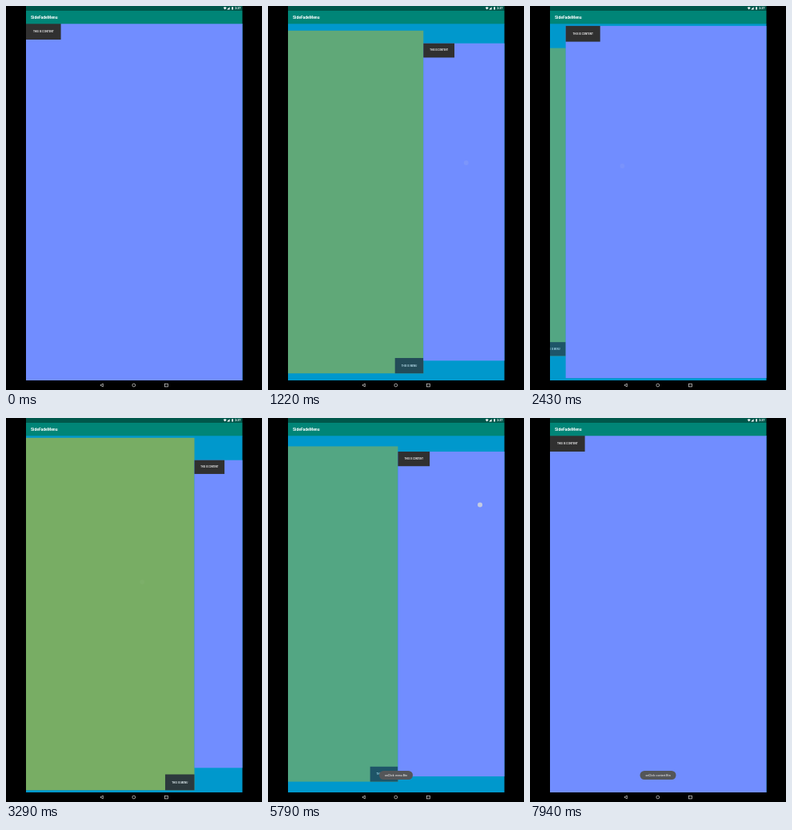
Write an HTML page that moves like this. It is 320 px wide and 480 px high and loops after 8 s.

```html
<!DOCTYPE html>
<html lang="en">
<head>
<meta charset="utf-8">
<title>SideFadeMenu</title>
<style>
html, body { margin: 0; width: 100%; height: 100%; overflow: hidden; background: #000; }
svg { display: block; width: 100vw; height: 100vh; }
text { font-family: Roboto, sans-serif; fill: #fff; }
.label { font-size: 3.2px; font-weight: 500; text-anchor: middle; }
</style>
</head>
<body>
<svg viewBox="0 0 320 480">
  <clipPath id="page"><rect x="25" y="22" width="270.5" height="446"/></clipPath>
  <rect width="320" height="480"/>
  <g clip-path="url(#page)">
    <rect x="25" y="22" width="271" height="446" fill="#0098cc"/>
    <!-- menu: origin at its right middle -->
    <g id="menu">
      <rect x="-230" y="-223" width="230" height="446" fill="#83af5b"/>
      <rect x="-37" y="203" width="37" height="20" fill="#303030"/>
      <text class="label" x="-18.5" y="214.2">THIS IS MENU</text>
    </g>
    <!-- content: origin at its left middle -->
    <g id="content">
      <rect y="-223" width="271" height="446" fill="#718dff"/>
      <rect y="-223" width="43.6" height="20" fill="#303030"/>
      <text class="label" x="21.8" y="-212">THIS IS CONTENT</text>
    </g>
  </g>
  <rect x="25" width="270.5" height="6" fill="#00574b"/>
  <rect x="25" y="6" width="270.5" height="16.3" fill="#008577"/>
  <text x="31" y="16" font-size="5" font-weight="700">SideFadeMenu</text>
  <g fill="#fff">
    <path d="M271.7 1.9q2-1.4 4 0l-2 2.7zM279.6 1.2v3.4h-3.4zM282.2 1.3h1.8v3.3h-1.8z"/>
    <text x="286.2" y="4.4" font-size="3.6" font-weight="700">2:37</text>
  </g>
  <g fill="none" stroke="#ddd" stroke-width=".7">
    <path d="M121.3 472.1v3.8l-3.5-1.9z"/>
    <circle cx="159.8" cy="474" r="1.9"/>
    <rect x="198.6" y="472.2" width="3.7" height="3.7"/>
  </g>
  <g id="toast">
    <rect y="441" height="11" rx="5.5" fill="#545659"/>
    <text x="160" y="447.8" font-size="3.5" text-anchor="middle"></text>
  </g>
  <circle id="dot" r="3" fill="#d2d6dc"/>
</svg>
<script>
const $ = id => document.getElementById(id);
const [menu, content, toast, dot] = ['menu', 'content', 'toast', 'dot'].map($);
const [toastBox, toastText] = toast.children;
const LOOP = 8000, TRAVEL = 229.5;

const clamp = v => Math.max(0, Math.min(1, v));
const ramp = (t, start, len) => clamp((t - start) / len);
const smooth = u => (1 - Math.cos(Math.PI * u)) / 2;
const settle = u => 1 - (1 - u) ** 5;

// Finger drags the page from one openness to another, then it settles.
const moves = [
  { down: 500, drag: 540, up: 1200, from: 0, mid: .6, to: 1, len: 260, x: 110, y: 196 },
  { down: 1930, drag: 1980, up: 2380, from: 1, mid: .3, to: 0, len: 230, x: 276, y: 200 },
  { down: 2930, drag: 2960, up: 3205, from: 0, mid: .52, to: 1, len: 290, x: 51, y: 205 },
  { down: 5650, drag: 5650, up: 5752, from: 1, mid: 1, to: 0, len: 400, x: 265, y: 108.5, hold: 80 },
  { down: 4360, up: 4560, x: 242, y: 457 },
  { down: 6950, up: 7230, x: 46, y: 32 }
].sort((a, b) => a.down - b.down);

const toasts = [
  { text: 'onClick: menu Btn', width: 42, on: 4580, off: 6560 },
  { text: 'onClick: content Btn', width: 45, on: 7250, off: 9000 }
];

function openness(t) {
  let p = 0;
  for (const m of moves) {
    if (m.len === undefined || t < m.down) continue;
    p = t < m.up
      ? m.from + (m.mid - m.from) * smooth(ramp(t, m.drag, m.up - m.drag))
      : m.mid + (m.to - m.mid) * settle(ramp(t, m.up, m.len));
  }
  return p;
}

function drawDot(t) {
  const m = moves.findLast(m => t >= m.down);
  if (!m) return dot.setAttribute('opacity', 0);
  const lift = m.up + (m.hold || 0);
  const shift = m.len ? (m.mid - m.from) * smooth(ramp(t, m.drag, m.up - m.drag)) : 0;
  dot.setAttribute('cx', m.x + shift * TRAVEL);
  dot.setAttribute('cy', m.y);
  dot.setAttribute('opacity', t < lift ? .85 : .15 * (1 - ramp(t, lift, 130)));
}

function drawToast(t) {
  const m = toasts.findLast(m => t >= m.on) || toasts[0];
  toastBox.setAttribute('x', 160 - m.width / 2);
  toastBox.setAttribute('width', m.width);
  if (toastText.textContent !== m.text) toastText.textContent = m.text;
  toast.setAttribute('opacity', ramp(t, m.on, 300) * (1 - ramp(t, m.off, 250)));
}

function draw(now) {
  const t = now % LOOP, p = openness(t), x = 25 + TRAVEL * p;
  const place = (el, scale) => el.setAttribute('transform', `translate(${x} 245) scale(${scale})`);
  place(content, 1 - .15 * p);
  place(menu, .85 + .15 * p);
  menu.setAttribute('opacity', Math.max(.64, p));
  drawToast(t);
  drawDot(t);
}

const start = performance.now();
(function frame() {
  draw(performance.now() - start);
  requestAnimationFrame(frame);
})();
</script>
</body>
</html>
```
